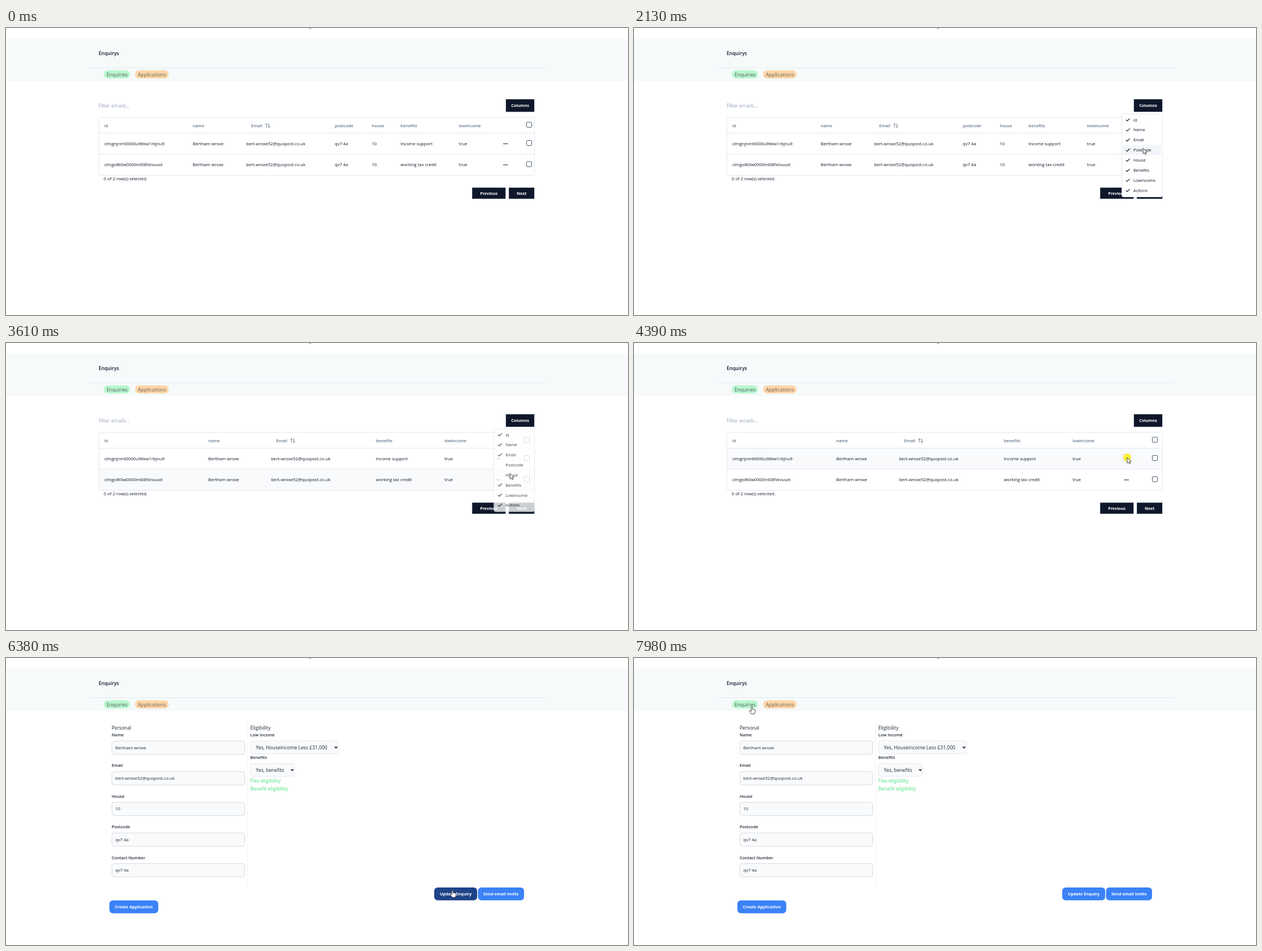
An HTML page for the animation above (8000 ms loop, 1101 by 509 pixels).

```html
<!DOCTYPE html>
<html lang="en">
<head>
<meta charset="utf-8">
<title>Enquirys</title>
<style>
  html, body { margin: 0; width: 100%; height: 100%; overflow: hidden; background: #fff; }
  svg { display: block; width: 100vw; height: 100vh; }
  text { font-family: "Open Sans", "Noto Sans", sans-serif; white-space: pre; }
</style>
</head>
<body>
<svg id="stage" viewBox="0 0 1101 509"></svg>
<script>
const LOOP = 8000;
const INK = '#0f172a', LINE = '#e2e8f0', MUTED = '#64748b', BLUE = '#3b82f6';
const PERSON = 'Bertham wroxe', EMAIL = 'bert-wroxe52@quopost.co.uk', POSTCODE = 'qv7 4a';

// Markup helpers: text is centred vertically on y.
const text = (x, y, value, size = 7.65, fill = INK, weight = 400, anchor = 'start') =>
  `<text x="${x}" y="${y + size * 0.35}" font-size="${size}" fill="${fill}" font-weight="${weight}" text-anchor="${anchor}">${value}</text>`;
const box = (x, y, w, h, fill, radius = 0, extra = '') =>
  `<rect x="${x}" y="${y}" width="${w}" height="${h}" rx="${radius}" fill="${fill}" ${extra}/>`;
const path = (d, stroke, width = 1) =>
  `<path d="${d}" fill="none" stroke="${stroke}" stroke-width="${width}"/>`;
const group = (id, body) => `<g id="${id}">${body}</g>`;
const button = (x, y, w, h, label, fill, radius = 0, id = '') =>
  box(x, y, w, h, fill, radius, id && `id="${id}"`) +
  text(x + w / 2, y + h / 2, label, 7.25, '#fff', 700, 'middle');
const darkButton = (x, y, w, h, label, id) =>
  box(x - 0.3, y - 0.3, w + 0.6, h + 0.6, '#cbd5e1') + button(x + 0.25, y + 0.25, w - 0.5, h - 0.5, label, INK, 0, id);

function header() {
  return box(0, 19, 1101, 75, '#f6fafb') +
    '<circle cx="538.5" cy="-2" r="3" fill="#777"/>' +
    text(164, 44.5, 'Enquirys', 8.6, INK, 600) +
    path('M146 70.5H956', '#e5eaee') +
    box(173, 75, 46.5, 14.5, '#bbf7d0', 7.2) + text(178, 82.5, 'Enquiries', 8.6, '#4b5f5a') +
    box(228.5, 75, 59.5, 14.5, '#fed7aa', 7.2) + text(233.3, 82.5, 'Applications', 8.8, '#6b5d50');
}

const records = [
  { y: 205, id: 'clmgnjnmt0000u96kw1rbjnu9', benefit: 'Income support' },
  { y: 242.5, id: 'clmgo8t0w0000ml08fxtvuuxt', benefit: 'working tax credit' },
];
const layouts = [
  { name: 330.5, email: 425, postcode: 582, house: 647.5, benefits: 698.3, lowincome: 801.7, dots: 884.3, check: 926 },
  { name: 345, email: 448, house: 620, benefits: 675.3, lowincome: 788.3, dots: 877.5, check: 923.6 },
  { name: 358, email: 469.2, benefits: 654.7, lowincome: 776.2, dots: 871.7, check: 922 },
];

function columns(c, index) {
  const checkbox = y => box(c.check - 4.5, y - 4.5, 9, 9, '#fff', 1.2, 'stroke="#475569"');
  const head = (x, label) => x ? text(x, 173, label, 7.45, MUTED, 600) : '';
  const arrow = c.email + 34;
  let out = head(174, 'id') + head(c.email + 9, 'Email') + checkbox(171.6) +
    ['name', 'postcode', 'house', 'benefits', 'lowincome'].map(k => head(c[k], k)).join('') +
    path(`M${arrow + 2.2} 176.5V169.5m-2 2l2 -2l2 2M${arrow + 6.4} 169.5v7m-2 -2l2 2l2 -2`, MUTED, 0.9);
  for (const r of records) {
    const cells = [[174, r.id], [c.name, PERSON], [c.email, EMAIL], [c.postcode, POSTCODE],
      [c.house, '10'], [c.benefits, r.benefit], [c.lowincome, 'true']];
    out += cells.map(([x, v]) => x ? text(x, r.y, v) : '').join('') + checkbox(r.y - 1);
    for (const dx of [-2.8, 0, 2.8]) out += `<circle cx="${c.dots + dx}" cy="${r.y + 0.3}" r="0.95" fill="${INK}"/>`;
  }
  return group('layout' + index, out);
}

function tablePage() {
  return text(164, 138, 'Filter emails...', 8.55, '#94a3b8') +
    darkButton(884.7, 126.2, 50.6, 22.6, 'Columns', 'columnsButton') +
    box(165, 187, 770, 36.5, '#f9fafc', 0, 'id="row0"') +
    box(165, 224, 770, 37, '#f9fafc', 0, 'id="row1"') +
    box(862.8, 195.5, 18, 18, '#f1f5f9', 1, 'id="dotsButton"') +
    box(164.5, 158.5, 771, 103, 'none', 3, `stroke="${LINE}"`) +
    path('M165 186.5H935M165 223.5H935', LINE) +
    layouts.map(columns).join('') +
    text(173, 267.4, '0 of 2 row(s) selected.', 7.7) +
    darkButton(825, 283, 59.4, 20, 'Previous') + darkButton(890, 283, 45.3, 20, 'Next');
}

const menuItems = ['Id', 'Name', 'Email', 'Postcode', 'House', 'Benefits', 'Lowincome', 'Actions'];
const itemY = i => 162.7 + i * 17.9;
const panel = (x, y, w, h) =>
  box(x, y + 2, w, h + 2, '#0f172a', 4, 'opacity=".05"') +
  box(x, y, w, h, '#fff', 3, `stroke="${LINE}"`);

function columnsMenu() {
  return panel(863.5, 152.5, 72, 147) + box(866, 0, 67, 17.6, '#f1f5f9', 2, 'id="columnHover"') +
    menuItems.map((label, i) =>
      `<g id="tick${label}">${path(`M870.8 ${itemY(i)}l2.2 2.2l4.6 -4.6`, INK, 1.1)}</g>` +
      text(884, itemY(i) + 0.3, label, 7.35)).join('');
}

function rowMenu() {
  return panel(799.5, 216.5, 81.5, 83) + box(802, 237, 77, 17.8, '#f1f5f9', 2, 'id="rowItemHover"') +
    text(806.5, 228, 'Actions', 7.35, INK, 600) + text(806.5, 246, 'Open enquiry', 7.35) +
    path('M800 257.5H881', '#f1f5f9') +
    text(806.5, 269, 'View customer', 7.35) + text(806.5, 287, 'View payment details', 7.35);
}

function formPage() {
  const fields = [['Name', PERSON], ['Email', EMAIL], ['House', '10'], ['Postcode', POSTCODE], ['Contact Number', POSTCODE]];
  const label = (x, y, value) => text(x, y, value, 7.45, '#1f2937', 600);
  const select = (y, w, value) =>
    box(433, y, w, 23, '#f9fafb', 3.5, 'stroke="#e5e7eb"') + text(442.3, y + 12, value, 8.6, '#1f2937') +
    path(`M${427 + w} ${y + 10.3}l2.2 2.3l2.2 -2.3`, '#111827', 1.5);
  return text(187, 124, 'Personal', 8.5, '#1f2937') +
    fields.map(([name, value], i) => {
      const y = 147 + i * 54.35;
      return label(187, y - 10.5, name) +
        box(187.5, y + 0.2, 235, 23.5, '#f9fafb', 4, 'stroke="#d6dae0"') + text(193.5, y + 12, value, 7.65, '#1f2937');
    }).join('') +
    path('M427.5 111V407', '#f3f4f6') +
    text(432.5, 124, 'Eligibility', 8.75, '#1f2937') +
    label(432.5, 136.5, 'Low Income') + select(147, 155, 'Yes, Houseincome Less £31,000') +
    label(432.5, 176.5, 'Benefits') + select(187, 77.5, 'Yes, benefits') +
    text(432.5, 217.7, 'Flex eligibility', 8.7, '#4ade80', 500) + text(432.5, 231.7, 'Benefit eligibility', 8.7, '#4ade80', 500) +
    button(183, 430, 86.5, 22.7, 'Create Application', BLUE, 6) +
    button(758, 407, 76, 22.7, 'Update Enquiry', BLUE, 6, 'updateButton') +
    button(835.5, 407, 81.5, 22.7, 'Send email invite', BLUE, 6);
}

const pointer = '<path id="arrow" d="M0 0V10.2L2.4 8L4 11.6L5.7 10.9L4.1 7.4H7.3Z" fill="#fff" stroke="#222" stroke-width=".8"/>' +
  '<path id="hand" d="M-1 .9Q0 -.3 1 .9V5Q2 4.2 2.8 5.2Q3.8 4.5 4.5 5.5Q6 5.2 6.1 6.6V9.5L4.8 13H-.8L-4 8.2Q-4.2 6.6 -2.7 7L-1 8.4Z" fill="#fff" stroke="#222" stroke-width=".8"/>';

const stage = document.getElementById('stage');
stage.innerHTML = header() + group('table', tablePage()) + group('columnsMenu', columnsMenu()) +
  group('rowMenu', rowMenu()) + group('form', formPage()) +
  '<circle id="click" r="7" fill="#fcee21" opacity=".88"/>' + group('pointer', pointer);

const parts = {};
stage.querySelectorAll('[id]').forEach(el => parts[el.id] = el);

// Timeline: menus as [open, close], clicks as [press, release], pointer as [time, x, y].
const columnMenus = [[1060, 2290], [2845, 3580]];
const rowMenuSpan = [4440, 4880];
const clicks = [[960, 1050], [2200, 2285], [2765, 2850], [3490, 3575], [4350, 4430], [4790, 4880], [6420, 6505]];
const SHOW_FORM = 5290, SLIDE = [5301, 5621];
const route = [
  [340, 1046, 492], [940, 896.5, 126], [1150, 896.5, 126], [1900, 901, 213], [2350, 901, 213],
  [2740, 911.5, 140], [2930, 911.5, 140], [3440, 892, 231], [4010, 892, 231], [4340, 873, 203],
  [4440, 873, 203], [4750, 828.5, 243.5], [5690, 828.5, 243.5], [6340, 790.5, 411.5],
  [6910, 790.5, 411.5], [7700, 241, 104], [7960, 208.5, 86.3],
];

const clamp = v => Math.min(1, Math.max(0, v));
const ease = v => v < 0.5 ? 2 * v * v : 1 - 2 * (1 - v) * (1 - v);
const within = (t, [a, b]) => t >= a && t < b;
const fade = (t, [a, b]) => clamp((t - a) / 150) * (1 - clamp((t - b) / 150));
const show = (el, on) => el.setAttribute('visibility', on ? 'visible' : 'hidden');

function pointerAt(t) {
  const i = route.findIndex(p => p[0] > t);
  if (i === 0) return route[0].slice(1);
  if (i < 0) return route[route.length - 1].slice(1);
  const [a, b] = [route[i - 1], route[i]];
  const k = ease((t - a[0]) / (b[0] - a[0]));
  return [a[1] + (b[1] - a[1]) * k, a[2] + (b[2] - a[2]) * k];
}

function setMenu(el, opacity, x, y) {
  const s = 0.985 + 0.015 * opacity;
  el.setAttribute('opacity', opacity);
  el.setAttribute('transform', `translate(${x} ${y}) scale(${s}) translate(${-x} ${-y})`);
}

function render(t) {
  const [x, y] = pointerAt(t);
  const visible = t >= 340;
  const over = (left, top, w, h) => visible && x >= left && x < left + w && y >= top && y < top + h;
  const onForm = t >= SHOW_FORM;
  const menuOpen = [...columnMenus, rowMenuSpan].some(span => within(t, span));

  parts.table.style.display = onForm ? 'none' : '';
  parts.form.style.display = onForm ? '' : 'none';
  const current = columnMenus.filter(([, close]) => t >= close).length;
  layouts.forEach((_, i) => parts['layout' + i].style.display = i === current ? '' : 'none');
  parts.columnsButton.setAttribute('fill', over(885, 126, 50, 23) ? '#1d273a' : INK);
  show(parts.tickPostcode, current < 1);
  show(parts.tickHouse, current < 2);

  const free = !onForm && !menuOpen;
  for (const [id, on] of [
    ['row0', free && over(165, 187, 770, 36.5)],
    ['row1', free && over(165, 224, 770, 37)],
    ['dotsButton', free && over(863, 195, 18, 18)],
  ]) parts[id].style.display = on ? '' : 'none';

  setMenu(parts.columnsMenu, Math.max(...columnMenus.map(span => fade(t, span))), 935, 152);
  setMenu(parts.rowMenu, onForm ? 0 : fade(t, rowMenuSpan), 881, 216);
  const item = Math.floor((y - itemY(0) + 8.95) / 17.9);
  const onItem = item >= 0 && item < menuItems.length && columnMenus.some(span => within(t, span));
  parts.columnHover.style.display = onItem ? '' : 'none';
  parts.columnHover.setAttribute('y', itemY(item) - 8.8);
  parts.rowItemHover.style.display = over(802, 237, 77, 18) ? '' : 'none';

  const slide = 958 * (1 - ease(clamp((t - SLIDE[0]) / (SLIDE[1] - SLIDE[0]))));
  parts.form.setAttribute('transform', `translate(${slide} 0)`);
  const onUpdate = onForm && over(758, 407, 76, 23);
  parts.updateButton.setAttribute('fill', onUpdate ? '#1e4388' : BLUE);

  const hand = onUpdate || over(173, 75, 46.5, 14.5);
  parts.pointer.setAttribute('transform', `translate(${x} ${y})`);
  parts.pointer.style.display = visible ? '' : 'none';
  show(parts.arrow, !hand);
  show(parts.hand, hand);
  parts.click.setAttribute('cx', x);
  parts.click.setAttribute('cy', y);
  show(parts.click, clicks.some(span => within(t, span)));
}

const start = performance.now();
function tick() {
  render((performance.now() - start) % LOOP);
  requestAnimationFrame(tick);
}
tick();
</script>
</body>
</html>
```
